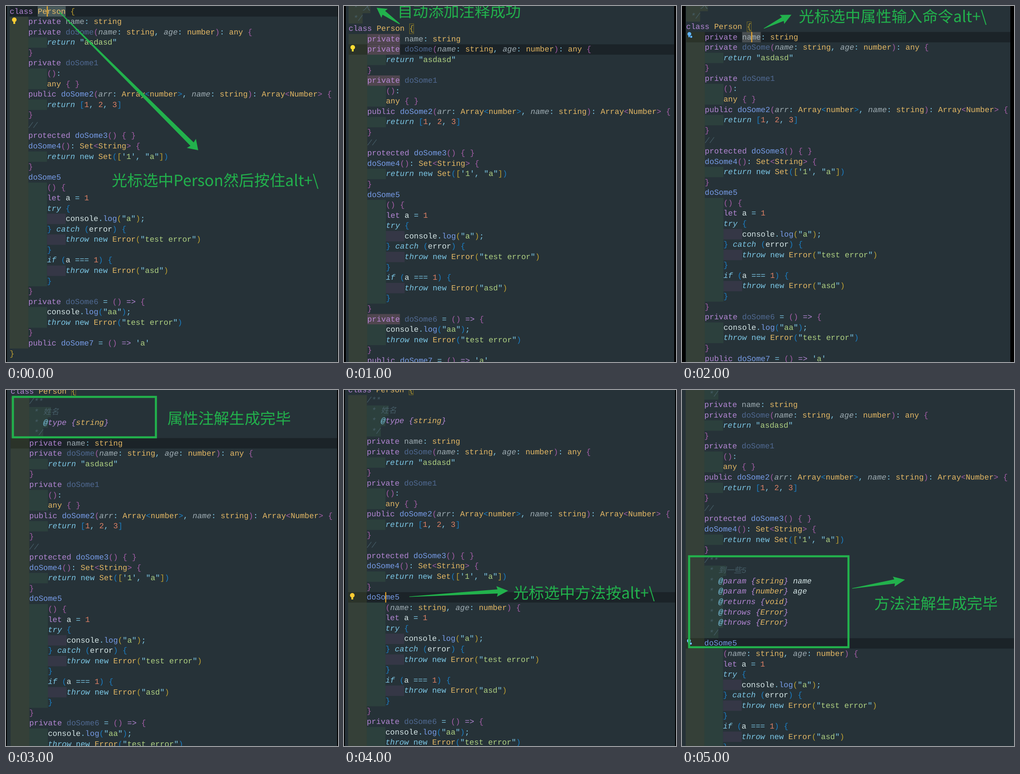
Recreate the animation shown at these times as an HTML page. Size 722 by 775 pixels, loop 6 s.

```html
<!DOCTYPE html>
<html lang="zh">
<head>
<meta charset="utf-8">
<title>Comment generator demo</title>
<style>
  html, body { margin: 0; width: 100%; height: 100%; overflow: hidden; background: #000; }
  svg { display: block; position: absolute; left: 0; top: 0; }
  text { white-space: pre; text-rendering: geometricPrecision; }
  .code { font: 16.92px "Liberation Mono", "Noto Sans CJK SC", monospace; fill: #eeffff; opacity: .88; }
  .note { font: 33.6px "Noto Sans CJK SC", "Noto Sans CJK", sans-serif; }
  .note, .arrow { fill: #22b14c; }
  .frame { fill: none; stroke: #22b14c; stroke-width: 4.5; }
  .comment { fill: #4a636e; font-style: italic; }
  .string { fill: #c3e88d; }
  .flow { fill: #89ddff; font-style: italic; }
  .punct { fill: #89ddff; }
  .keyword { fill: #c792ea; }
  .type { fill: #ffcb6b; }
  .param { fill: #b0bec5; font-style: italic; }
  .prop { fill: #b0bec5; }
  .faded { fill: #56719f; }
  .fn { fill: #82aaff; }
  .num { fill: #f78c6c; }
  .doc { font-style: italic; }
  .bracket { fill-opacity: .8; }
</style>
</head>
<body>
<svg id="stage" width="722" height="775" viewBox="0 0 722 775"></svg>
<script>
const COL = 10.152, ROW = 22.58, STEP = 1000;
const INDENT = ['rgba(255,255,64,.07)', 'rgba(127,255,127,.07)', 'rgba(255,127,255,.07)'];
const BRACKETS = ['#ffd02f', '#da70d6', '#179fff'];

const methods = `class Person {
    private name: string
    private doSome(name: string, age: number): any {
        return "asdasd"
    }
    private doSome1
        ():
        any { }
    public doSome2(arr: Array<number>, name: string): Array<Number> {
        return [1, 2, 3]
    }
    //
    protected doSome3() { }
    doSome4(): Set<String> {
        return new Set(['1', "a"])
    }
    doSome5
        () {
        let a = 1
        try {
            console.log("a");
        } catch (error) {
            throw new Error("test error")
        }
        if (a === 1) {
            throw new Error("asd")
        }
    }
    private doSome6 = () => {
        console.log("aa");
        throw new Error("test error")
    }
    public doSome7 = () => 'a'
}`;
const propDoc = `    /**
     * 姓名
     * @type {string}
     */
`;
const methodDoc = `    /**
     * 到一些5
     * @param {string} name
     * @param {number} age
     * @returns {void}
     * @throws {Error}
     * @throws {Error}
     */
`;
const withHeader = ' * 人\n */\n' + methods;
const withProp = methods.replace('    private name', propDoc + '    private name');
const withParams = withProp.replace('        () {', '        (name: string, age: number) {');
const withMethod = withParams.replace('    doSome5', methodDoc + '    doSome5');

// top: y of the first row; marks: [row, column, length, colour]
const scenes = [
  { code: methods, x: 8, top: 0.5, clip: [2, 721], active: 0, cursor: 8,
    marks: [[0, 6, 6, '#48595a']], bulb: ['#fc3', 18, 32],
    arrow: [116, 13, 418, 314, 1, 5, 21, 14], note: [230, 379, '光标选中Person然后按住alt+\\'] },
  { code: withHeader, x: 10, top: -6.9, clip: [4, 718], active: 4, match: 2,
    marks: [3, 4, 7, 30].map(row => [row, 4, 7, '#50464f']), bulb: ['#fd3', 19, 92],
    arrow: [121, 39, 71, 4, 1, 5, 21, 12], note: [116, 11, '自动添加注释成功'] },
  { code: withHeader, x: 9, top: -11.2, clip: [8, 714], active: 3, cursor: 14, match: 2,
    marks: [[3, 12, 4, '#484e51']], bulb: ['#5fb4ff', 16, 63, true],
    arrow: [178, 49, 238, 19, .5, 4.5, 23, 11], note: [254, 22, '光标选中属性输入命令alt+\\'] },
  { code: withProp, x: 10, top: -8.2, clip: [2, 720], active: 5, match: 0,
    frame: [15, 15, 311, 88], note: [351, 61, '属性注解生成完毕'] },
  { code: withParams, x: 9, top: -11.5, clip: [2, 720], active: 20, cursor: 8, match: 0,
    bulb: ['#fc3', 18, 449],
    arrow: [142, 450, 357, 437, .5, 4.5, 25, 11.5], note: [368, 441, '光标选中方法按alt+\\'] },
  { code: withMethod, x: 8, top: -91.9, clip: [0, 722], active: 28,
    bulb: ['#75beff', 15, 548, true], frame: [15.5, 362, 346.5, 198],
    arrow: [370, 432, 485, 413, .5, 4.5, 25, 11], note: [418, 464, '方法注解生成完毕'] },
];

const esc = s => s.replace(/&/g, '&amp;').replace(/</g, '&lt;');
const span = (cls, s) => `<tspan class="${cls}">${esc(s)}</tspan>`;
const rect = (x, y, w, h, fill, extra = '') =>
  `<rect x="${x}" y="${y}" width="${w}" height="${h}" fill="${fill}" ${extra}/>`;

const rules = Object.entries({
  string: `"[^"]*"|'[^']*'`,
  flow: '\\b(?:return|try|catch|throw|if)\\b',
  keyword: '\\b(?:class|private|public|protected|let)\\b|=>',
  param: '(?<=\\(|, )(?:name|age|arr)(?=:)',
  type: '\\b(?:any|string|number|String|Number|Array|Set|Error|Person)\\b',
  faded: '(?<=private )doSome\\d?',
  fn: 'doSome\\d|\\blog\\b',
  prop: '\\bname\\b',
  num: '\\b\\d\\b',
  bracket: '[()[\\]{}]|<|(?<=\\w)>',
  punct: '\\bnew\\b|[:;,.=]+(?!>)',
  plain: '\\w+|\\s+',
});
const tokens = new RegExp(rules.map(([name, re]) => `(?<${name}>${re})`).join('|'), 'g');

function highlighter() {
  let depth = 0;
  const bracket = c => {
    const level = '([{<'.includes(c) ? depth++ : --depth;
    return `<tspan class="bracket" fill="${BRACKETS[level % 3]}">${esc(c)}</tspan>`;
  };
  return line => {
    const tag = line.match(/^( *\* )@(\w+) \{(\w+)\}(.*)/);
    if (tag) {
      return span('comment', tag[1]) + span('flow', '@') + span('keyword doc', tag[2] + ' {') +
        span('type doc', tag[3]) + span('keyword doc', '}') + span('doc', tag[4]);
    }
    if (/^ *(\/\/|\/?\*)/.test(line)) return span('comment', line);
    return line.replace(tokens, (s, ...rest) => {
      const groups = rest.at(-1);
      const kind = Object.keys(groups).find(k => groups[k] !== undefined);
      if (kind === 'bracket') return bracket(s);
      if (kind === 'string') {
        return span('punct', s[0]) + span('string', s.slice(1, -1)) + span('punct', s[0]);
      }
      return kind === 'plain' ? s : span(kind, s);
    });
  };
}

const textWidth = s => [...s].reduce((w, c) => w + (c > '\u2e80' ? 16.92 : COL), 0);

// Each indent block takes four characters, even when text begins inside it.
function indentBands(line, x, y) {
  const lead = line.search(/\S/);
  let out = '';
  for (let i = 0; i < lead; i += 4) {
    out += rect(x + i * COL, y, textWidth(line.slice(i, i + 4)), ROW, INDENT[i / 4]);
  }
  return out;
}

function arrow([x1, y1, x2, y2, tail, neck, head, wing]) {
  const length = Math.hypot(x2 - x1, y2 - y1), base = length - head;
  const angle = Math.atan2(y2 - y1, x2 - x1) * 180 / Math.PI;
  const points = [[0, -tail], [base + 2, -neck], [base, -wing], [length, 0],
    [base, wing], [base + 2, neck], [0, tail]];
  return `<polygon class="arrow" points="${points.join(' ')}"
    transform="translate(${x1} ${y1}) rotate(${angle})"/>`;
}

function bulb([color, x, y, fix]) {
  return `<circle cx="${x}" cy="${y - 2}" r="${fix ? 4.2 : 5}" fill="${color}"/>` +
    rect(x - 2, y + 1, 4, fix ? 4 : 6, color) +
    (fix ? `<circle cx="${x + 4}" cy="${y + 4}" r="3" fill="${color}" stroke="#1b2429"/>` : '');
}

function draw(s) {
  const rowY = row => s.top + row * ROW, colX = col => s.x + col * COL;
  const [left, right] = s.clip;
  const paint = highlighter();
  const lines = s.code.split('\n');
  let out = rect(left, 0, right - left, 775, '#263238') +
    rect(s.x, rowY(s.active), right - s.x, ROW, '#1b2328');
  lines.forEach((line, row) => out += indentBands(line, s.x, rowY(row)));
  for (const [row, col, len, color] of s.marks || []) {
    out += rect(colX(col), rowY(row), len * COL, ROW, color);
  }
  if (s.match !== undefined) {
    out += rect(colX(13) + .5, rowY(s.match) + .5, COL - 1, ROW - 1, 'none', 'stroke="#ffcc0060"');
  }
  lines.forEach((line, row) => {
    out += `<text class="code" x="${s.x}" y="${rowY(row) + 16}">${paint(line)}</text>`;
  });
  if (s.cursor) out += rect(colX(s.cursor) - .5, rowY(s.active), 2, ROW, '#ffb52e');
  if (s.bulb) out += bulb(s.bulb);
  if (s.frame) out += rect(...s.frame, 'none', 'class="frame"');
  if (s.arrow) out += arrow(s.arrow);
  const [x, y, label] = s.note;
  out += `<text class="note" x="${x}" y="${y + 12.6}">${label}</text>`;
  return `<g class="scene" opacity="0">${out}</g>`;
}

const stage = document.getElementById('stage');
stage.innerHTML = scenes.map(draw).join('');
const loop = scenes.length * STEP;
stage.querySelectorAll('.scene').forEach((scene, i) => scene.animate([
  { opacity: 1, offset: 0, easing: 'step-end' },
  { opacity: 0, offset: 1 / scenes.length, easing: 'step-end' },
  { opacity: 0, offset: 1 },
], { duration: loop, delay: i * STEP - loop, iterations: Infinity }));
</script>
</body>
</html>
```
